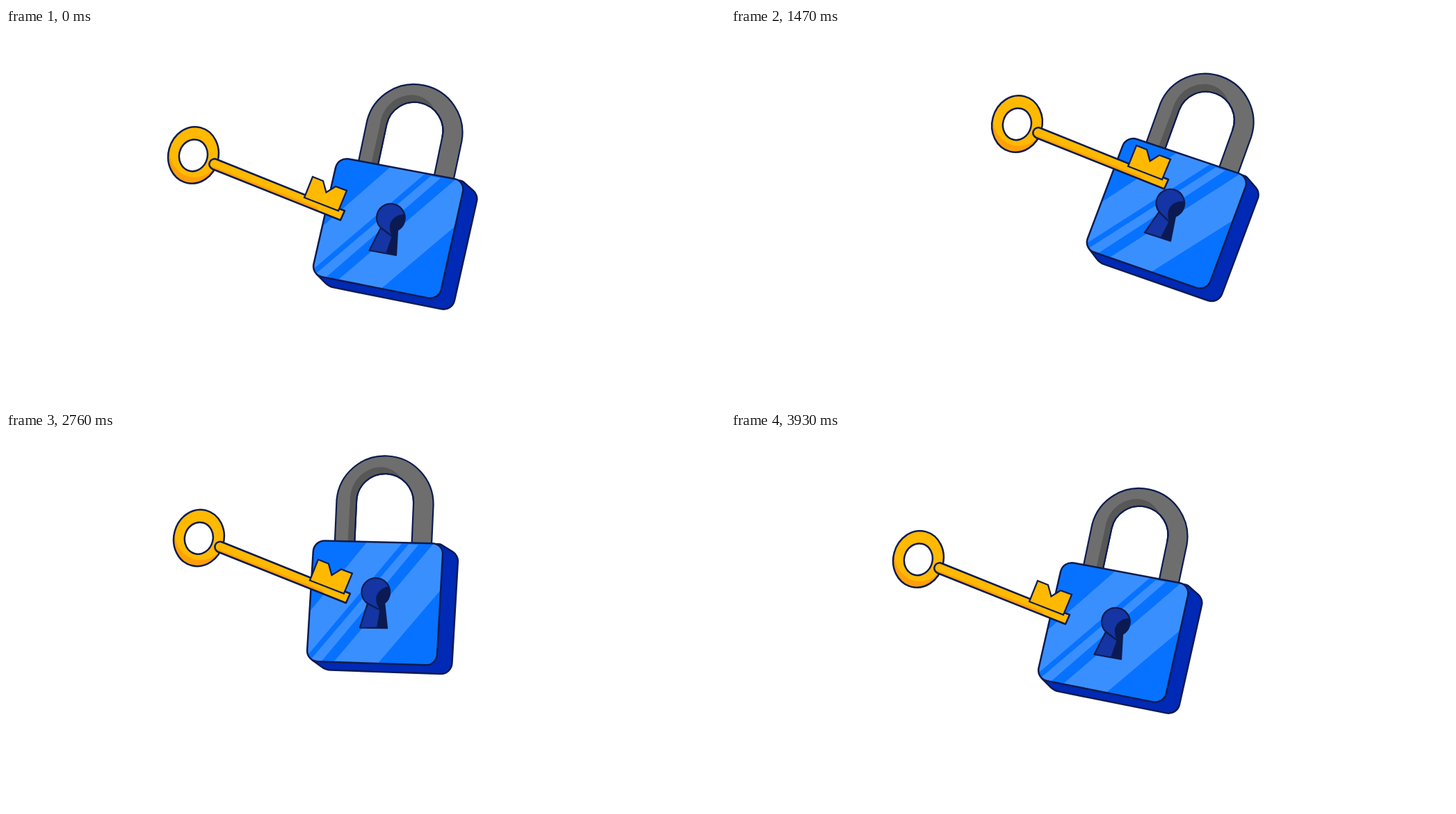
Write an HTML page that moves like this. It is 1034 px wide and 541 px high and loops after 4500 ms.

```html
<!DOCTYPE html>
<html lang="en">
<head>
<meta charset="utf-8">
<title>Lock and key</title>
<style>
  html, body { margin: 0; width: 100%; height: 100%; overflow: hidden; background: #fff; }
  svg { display: block; width: 100%; height: 100%; }
  .line { stroke: #0d1b4f; stroke-width: 2.5; stroke-linejoin: round; }
  .thin { stroke-width: 2.2; }
  .none { fill: none; }
</style>
</head>
<body>
<svg viewBox="0 0 1034 541">
  <defs>
    <path id="face"/>
    <clipPath id="faceClip"><use href="#face"/></clipPath>
    <ellipse id="ring" cx="269.5" cy="183" rx="36" ry="41" transform="rotate(15 269.5 183)"/>
    <clipPath id="ringClip"><use href="#ring"/></clipPath>
    <path id="shaft" d="M303 189 L487 263 L481 276.5 L297 203 A7.5 7.5 0 0 1 303 189Z"/>
  </defs>

  <g id="lock">
    <g transform="translate(0.4 -1.2)">
      <path fill="#6e6e6e" class="line thin"
        d="M502 215 L519 134 A69.7 69.7 0 0 1 655 164 L640 235 L611 235 L627 158 A41 41 0 0 0 547 140 L531 215Z"/>
      <path fill="#575757"
        d="M523 205 L537.5 140 C541 114 561 98 583 97.5 C599 97.5 610 107 616 119 A41 41 0 0 0 547 140 L533 205Z"/>
      <path class="line thin none" d="M531 215 L547 140 A41 41 0 0 1 627 158"/>
    </g>

    <path id="side" fill="#0029b5" class="line"/>
    <use href="#face" fill="#0772ff"/>
    <g clip-path="url(#faceClip)" fill="#3a8fff">
      <path d="M570 185 L436 302 L436 352 L601 211 L632 185Z"/>
      <path d="M611 213 L625 216 L461 358 L446 365 L438 360Z"/>
      <path d="M643 221 L680 189 L670 265 L536 378 L457 380Z"/>
    </g>
    <use href="#face" class="line none"/>

    <path fill="#1435a3" d="M539 288 L522.5 320 L561 327 L563 291Z"/>
    <circle cx="553.5" cy="273" r="20.3" fill="#1435a3"/>
    <path fill="#0b1a52"
      d="M574 268 C563 267 551 276 552 287 C552 293 554 297 555 299 L546 324.5 L561 327 L563 291 A20.3 20.3 0 0 0 574 268Z"/>
    <path class="line thin none"
      d="M555 299.5 L539 287.5 A20.3 20.3 0 1 1 563 291 L561 327 L522.5 320 L539 287.5"/>
  </g>

  <g id="key">
    <g clip-path="url(#ringClip)">
      <ellipse cx="269.5" cy="183" rx="38" ry="43" fill="#ff9f0a"/>
      <ellipse cx="273" cy="174" rx="38" ry="41" fill="#ffb900" transform="rotate(15 273 174)"/>
    </g>
    <use href="#ring" class="line none"/>
    <ellipse cx="269.5" cy="183.3" rx="20.3" ry="23" fill="#fff" class="line" transform="rotate(15 269.5 183)"/>
    <use href="#shaft" fill="#ffb900"/>
    <path fill="#ff9f0a" d="M297 203 L294 198 L447 258 L450 264Z"/>
    <use href="#shaft" class="line none"/>
    <path fill="#ffb900" class="line thin" style="stroke-linejoin:miter"
      d="M441 214 L456 220 L460.5 236.5 L474 228 L490 234 L478 263 L429 244Z"/>
  </g>
</svg>
<script>
const LOOP = 4500, STEP = 30;
const $ = id => document.getElementById(id);

// Closed polygon with rounded corners; each point is [x, y, radius].
function rounded(points) {
  const n = points.length;
  const toward = (a, b) => {
    const k = a[2] / Math.hypot(b[0] - a[0], b[1] - a[1]);
    return [a[0] + (b[0] - a[0]) * k, a[1] + (b[1] - a[1]) * k];
  };
  return points.map((p, i) => {
    const a = toward(p, points[(i + n - 1) % n]);
    const b = toward(p, points[(i + 1) % n]);
    const handle = s => s.map((v, j) => v + (p[j] - v) * 0.57);
    return `${i ? 'L' : 'M'}${a} C${handle(a)} ${handle(b)} ${b}`;
  }).join(' ') + 'Z';
}

$('face').setAttribute('d', rounded([[477.5, 185.5, 16], [660.5, 220, 16], [622.5, 391.5, 16], [439, 355, 16]]));
$('side').setAttribute('d', rounded([
  [480, 188, 10], [656, 220, 2], [679, 240, 9],
  [641.5, 407.5, 16], [464.5, 372, 7], [446, 353.5, 2]
]));

// Key poses: time, lock x, lock y, lock turn, key x, key y.
const REST = [0, 0, 0, 0, 0];
const poses = [
  [540, ...REST],
  [780, 23, 8, 2, 56, -11],
  [1020, 57.5, -1, 4.6, 132, -27.5],
  [1470, 78.5, -21, 7.9, 142, -45],
  [1950, 15.5, -55, 7.6, 33, -42],
  [2430, -33, -70.5, -1.5, -39.5, -71],
  [2700, -24, -49, -8, -7, -42],
  [3090, -7.5, -5.5, -15, 114, 48.5],
  [3930, ...REST]
];

// Speed of channel c at pose i, zero at both ends.
function speed(i, c) {
  const [p, q, r] = [poses[i - 1], poses[i], poses[i + 1]];
  if (!p || !r) return 0;
  const before = q[0] - p[0], after = r[0] - q[0];
  return ((q[c] - p[c]) / before * after + (r[c] - q[c]) / after * before) / (before + after);
}

// Smooth cubic through the poses.
function poseAt(t) {
  const last = poses.length - 1;
  if (t <= poses[0][0] || t >= poses[last][0]) return REST;
  const i = poses.findIndex(p => p[0] > t) - 1;
  const a = poses[i], b = poses[i + 1];
  const h = b[0] - a[0], u = (t - a[0]) / h, v = 1 - u;
  return REST.map((_, k) => {
    const c = k + 1;
    return v * v * (1 + 2 * u) * a[c] + u * u * (3 - 2 * u) * b[c]
      + h * u * v * (v * speed(i, c) - u * speed(i + 1, c));
  });
}

function draw(now) {
  const t = Math.floor((now % LOOP) / STEP) * STEP;
  const [lockX, lockY, turn, keyX, keyY] = poseAt(t);
  $('lock').setAttribute('transform', `translate(${lockX} ${lockY}) rotate(${turn} 553.5 273)`);
  $('key').setAttribute('transform', `translate(${keyX} ${keyY})`);
}

let start;
function tick(now) {
  start ??= now;
  draw(now - start);
  requestAnimationFrame(tick);
}
draw(0);
requestAnimationFrame(tick);
</script>
</body>
</html>
```
